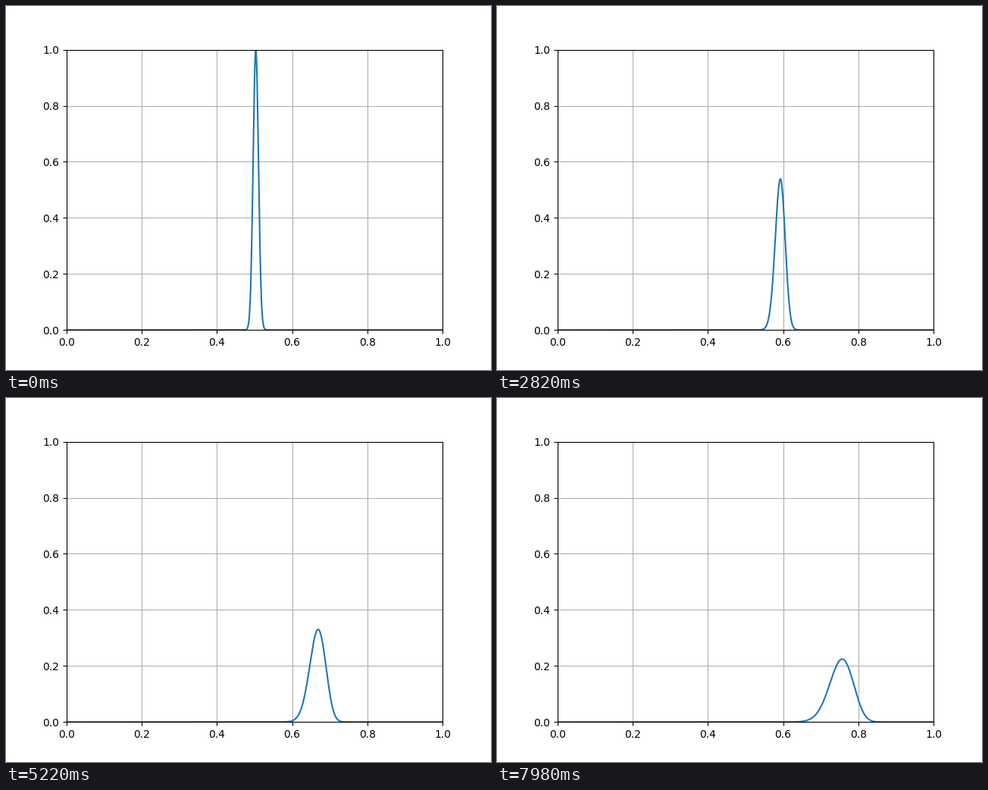
A matplotlib script for the animation above (8 s loop, 640 px wide and 480 px high).

```python
import numpy as np
import matplotlib.pyplot as plt
from matplotlib.animation import FuncAnimation

# Gaussian wave packet on a lattice, advanced by Crank-Nicolson steps
POINTS = 1000
CENTRE = 0.5
SIGMA = 0.01
WAVENUMBER = 500
DT = 2e-6
LEAD = 3.5        # steps already elapsed when the loop opens

LOOP_MS = 8000
TICK_MS = 20
STEP_MS = 30

x = np.linspace(0, 1, POINTS)
dx = x[1] - x[0]
start = np.exp(-(x - CENTRE) ** 2 / (2 * SIGMA ** 2) + 1j * WAVENUMBER * x)
spectrum = np.fft.fft(start)

# Phase gained per step by each lattice mode
energy = (1 - np.cos(2 * np.pi * np.fft.fftfreq(POINTS))) / dx ** 2
phase = 2 * np.arctan(energy * DT / 2)


def density(steps):
    psi = np.fft.ifft(spectrum * np.exp(-1j * phase * steps))
    return np.abs(psi) ** 2


fig, ax = plt.subplots(figsize=(6.4, 4.8), dpi=100)
ax.set_xlim(0, 1)
ax.set_ylim(0, 1)
ax.grid(True)
line, = ax.plot(x, density(LEAD))


def update(tick):
    step = (tick * TICK_MS + TICK_MS // 2) // STEP_MS
    line.set_ydata(density(step + LEAD))
    return line,


anim = FuncAnimation(fig, update, frames=LOOP_MS // TICK_MS, interval=TICK_MS,
                     repeat=True, repeat_delay=0, blit=False)
plt.show()
```
